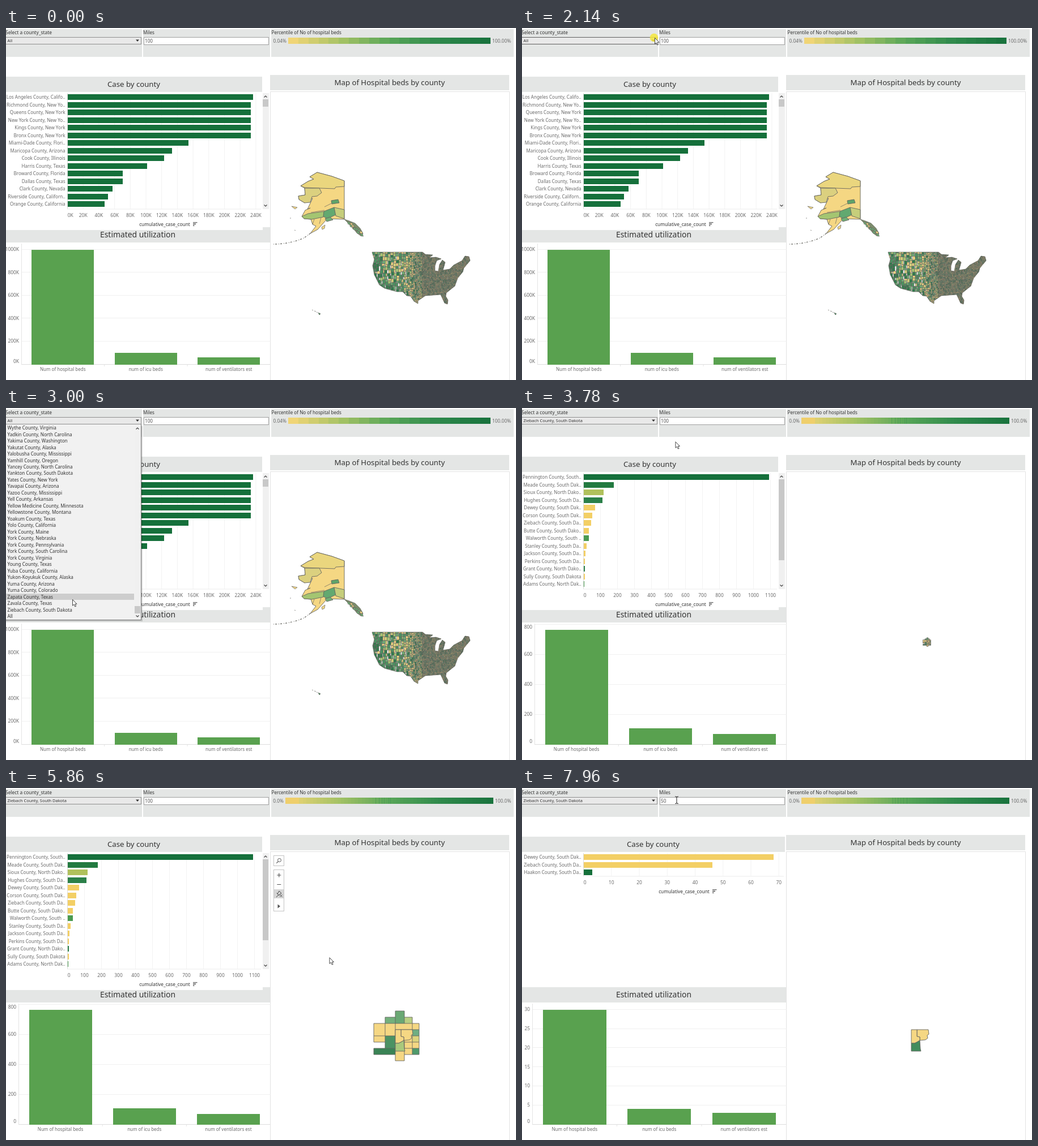
An HTML page for the animation above (8 s loop, 900 by 622 pixels).

```html
<!DOCTYPE html>
<html lang="en">
<head>
<meta charset="utf-8">
<title>Hospital beds dashboard</title>
<style>
html, body { margin: 0; width: 100%; height: 100%; overflow: hidden; background: #fff; }
svg { display: block; width: 900px; height: 622px; }
text { font-family: "Noto Sans", "Open Sans", sans-serif; white-space: pre; }
.title { font-weight: 500; }
rect { shape-rendering: crispEdges; }
.map path { stroke: #666660; stroke-width: .9; vector-effect: non-scaling-stroke; stroke-linejoin: round; }
</style>
</head>
<body>
<svg id="stage" viewBox="0 0 900 622"></svg>
<script>
const LOOP = 8000;
const stage = document.getElementById('stage');
const BAND = '#e4e6e5', INK = '#333', SOFT = '#6b6b6b', GREEN = '#59a14f';
const YEL = '#f5d783', GOLD = '#f3cf65', DARK = '#15703b', MID = '#2b8049', LEAF = '#4a9a50';

function el(parent, tag, attrs = {}) {
  const n = document.createElementNS('http://www.w3.org/2000/svg', tag);
  for (const k in attrs) n.setAttribute(k, attrs[k]);
  parent.appendChild(n);
  return n;
}
const group = (p, attrs) => el(p, 'g', attrs);
const rect = (p, x, y, width, height, fill, more) => el(p, 'rect', { x, y, width, height, fill, ...more });
const path = (p, d, fill = 'none', more) => el(p, 'path', { d, fill, ...more });
const line = (p, d, stroke, more) => path(p, d, 'none', { stroke, ...more });
function text(p, s, x, y, size = 8.1, fill = INK, anchor = 'start') {
  const n = el(p, 'text', { x, y, 'font-size': size, fill, 'text-anchor': anchor });
  n.textContent = s;
  return n;
}
const title = (p, s, x, y, size = 13.2) => text(p, s, x, y, size, INK, 'middle').setAttribute('class', 'title');
const show = (n, on) => n.setAttribute('display', on ? 'inline' : 'none');
const clamp = (v, lo, hi) => Math.max(lo, Math.min(hi, v));
const zoom = (x, y, k) => `translate(${x * (1 - k)} ${y * (1 - k)}) scale(${k}) `;

let seed = 11;
function rnd() {
  seed = (seed * 16807) % 2147483647;
  return seed / 2147483647;
}

// ---- fixed frame
for (const [x, w] of [[0, 240], [242, 224], [468, 428]]) rect(stage, x, 1.5, w, 49.5, BAND);
text(stage, 'Select a county_state', 81, 10.5, 8.35, INK, 'end');
text(stage, 'Miles', 242, 10.8);
text(stage, 'Percentile of No of hospital beds', 468.5, 10.8);
const sel = rect(stage, -.5, 16.5, 239, 12, '#e9e9e9', { stroke: '#8f8f8f' });
const selText = text(stage, 'All', 2.5, 25, 7.4);
path(stage, 'M229 20.5h6l-3 3.5z', INK);
rect(stage, 243.5, 16.5, 220, 13, '#fff', { stroke: '#a0a0a0' });
const miles = text(stage, '100', 245, 26, 8.2, '#555');
rect(stage, 466, 83, 422, 27, BAND);
title(stage, 'Map of Hospital beds by county', 677, 101);
line(stage, 'M466.5 622V112.5H888.5V622', '#e2e2e2');
rect(stage, 0, 352, 466, 27, BAND);
title(stage, 'Estimated utilization', 232.5, 370, 13.9);

// ---- legends
const RAMP = [[240, 213, 118], [165, 194, 101], [88, 166, 88], [47, 138, 76], [26, 116, 62]];
function ramp(k) {
  const p = Math.min(k, .9999) * 4, i = Math.floor(p);
  return `rgb(${RAMP[i].map((v, c) => Math.round(v + (RAMP[i + 1][c] - v) * (p - i)))})`;
}
function legend(p, x, w, steps, lo, hi) {
  text(p, lo, x - 3, 25.8, 8.4, SOFT, 'end');
  for (let i = 0; i < steps; i++) rect(p, x + i * w / steps, 17, w / steps + .4, 11, ramp(i / (steps - 1)));
  text(p, hi, x + w + 3, 25.8, 8.4, SOFT);
}

// ---- charts
function caseChart(p, { rows, ticks, step, unit = '', pitch, wide }) {
  const w = wide ? 464 : 452, bottom = wide ? 156 : 320;
  rect(p, 0, 86, w, 27, BAND);
  if (!wide) rect(p, 0, 113, 453, 244, '#fff');
  title(p, 'Case by county', w / 2 - .5, 103.5);
  for (let i = 0; i < ticks; i++) {
    const x = 108.5 + i * pitch, s = i * step + unit;
    line(p, `M${x} 115V${bottom}`, i ? '#f2f2f2' : '#dcdcdc');
    text(p, s, Math.max(x, 108.5 + s.length * 2.6), bottom + 13.5, 8.4, SOFT, 'middle');
  }
  line(p, `M108 ${bottom}H${w - 2}`, '#ececec');
  rows.forEach(([name, value, fill = DARK], i) => {
    const y = 122 + i * 13.53;
    text(p, name, 104.5, y + 3, 8.06, SOFT, 'end');
    rect(p, 109, Math.round(y) - 5, value / step * pitch, 10, fill);
  });
  const c = w / 2 + 54, y = bottom + 29.7;
  text(p, 'cumulative_case_count', c, y, 8.3, INK, 'middle');
  line(p, `M${c + 50} ${y - 6}h7.5m-7.5 2.7h5m-5 2.7h2.5`, INK, { 'stroke-width': 1.1 });
}
function scrollbar(p, x, top, bottom, y, h) {
  rect(p, x - 5.5, top, 11, bottom - top, '#f0f0f0');
  rect(p, x - 5, y, 10, h, '#c8c8c8');
  line(p, `M${x - 2.5} ${top + 7.5}l2.5 -2.5 2.5 2.5M${x - 2.5} ${bottom - 7.5}l2.5 2.5 2.5 -2.5`, '#444', { 'stroke-width': 1.2 });
}
const CATS = ['Num of hospital beds', 'num of icu beds', 'num of ventilators est'];
function useChart(p, { axis, step, unit = '', max, pitch, values }) {
  for (let i = 0; i * step <= max; i++) {
    const y = 594 - i * pitch;
    line(p, `M${axis} ${Math.floor(y) + .5}H466.5`, i ? '#f0f0f0' : '#dedede');
    text(p, i * step + unit, axis - 4, clamp(y, 387, 589) + 3, 8.4, SOFT, 'end');
  }
  line(p, `M${axis + .5} 381V594`, '#e4e4e4');
  const slot = (466.5 - axis) / 3;
  values.forEach((v, i) => {
    const mid = axis + (i + .5) * slot, h = v / step * pitch;
    rect(p, mid - slot * .375, 594.5 - h, slot * .75, h, GREEN);
    text(p, CATS[i], mid, 606, 8, SOFT, 'middle');
    if (i) line(p, `M${axis + i * slot} 595v3`, '#e4e4e4');
  });
}

const scenes = [0, 1, 2].map(() => group(stage));
const [all, near, close] = scenes;

legend(all, 498, 357, 20, '0.04%', '100.00%');
for (const p of [near, close]) {
  legend(p, 493, 367, 60, '0.0%', '100.0%');
  rect(p, 493, 17, 24, 11, '#efcf6c');
  for (let i = 0; i < 6; i++) rect(p, 652 + i * 5 + rnd() * 3, 17, 1, 11, '#3d9150', { opacity: .5 });
}

caseChart(all, {
  ticks: 13, step: 20, unit: 'K', pitch: 27.7,
  rows: [['Los Angeles County, Califo..', 236], ['Richmond County, New Yo..', 233], ['Queens County, New York', 233],
    ['New York County, New Yo..', 233], ['Kings County, New York', 233], ['Bronx County, New York', 233],
    ['Miami-Dade County, Flori..', 154], ['Maricopa County, Arizona', 133], ['Cook County, Illinois', 123],
    ['Harris County, Texas', 101], ['Broward County, Florida', 70], ['Dallas County, Texas', 70],
    ['Clark County, Nevada', 57], ['Riverside County, Californ..', 51], ['Orange County, California', 47]]
});
scrollbar(all, 458, 115, 320, 126, 13);

caseChart(near, {
  ticks: 12, step: 100, pitch: 30,
  rows: [['Pennington County, South..', 1090], ['Meade County, South Dak..', 178, '#237a40'],
    ['Sioux County, North Dako..', 117, '#b0c15c'], ['Hughes County, South Da..', 111, MID],
    ['Dewey County, South Dak..', 65, GOLD], ['Corson County, South Dak..', 50, GOLD],
    ['Ziebach County, South Da..', 43, GOLD], ['Butte County, South Dako..', 31, GOLD],
    ['Walworth County, South ..', 29, LEAF], ['Stanley County, South Da..', 17, GOLD],
    ['Jackson County, South Da..', 9, GOLD], ['Perkins County, South Da..', 7, GOLD],
    ['Grant County, North Dako..', 7, MID], ['Sully County, South Dakota', 7, GOLD],
    ['Adams County, North Dak..', 3, LEAF]]
});
scrollbar(near, 458, 115, 320, 126, 143);

caseChart(close, {
  ticks: 8, step: 10, pitch: 49.25, wide: true,
  rows: [['Dewey County, South Dak..', 68, GOLD], ['Ziebach County, South Da..', 46, GOLD], ['Haakon County, South Da..', 3]]
});

useChart(all, { axis: 27, step: 200, unit: 'K', max: 1000, pitch: 40.6, values: [1000, 101, 64] });
useChart(near, { axis: 22, step: 200, max: 800, pitch: 53, values: [766, 108, 70] });
useChart(close, { axis: 18, step: 5, max: 30, pitch: 33.8, values: [30, 4, 3] });

// ---- country map
const country = group(all, { class: 'map' });
const thin = { style: 'stroke-width:.7' };
path(country, 'M520 279L533 271 543 267 536 263 549 255 575 262 597 270V338L567 337 550 356 537 363 547 350 541 347' +
  ' 538 338 526 337 522 333 528 322 537 318 532 320 541 301 527 309 517 303 516 297 528 295 527 283Z', YEL);
path(country, 'M520 279L533 271 543 267 536 263 549 255 575 262 597 270V280L582 281 580 284 527 282Z', '#ead67e');
path(country, 'M527 283L553 283 557 291 549 297 540 298 537 308 527 309 517 303 516 297 528 295Z', '#dbd07f');
path(country, 'M522 333L533 328 562 324 560 334 540 338 526 337Z', '#a4c571');
path(country, 'M561 324L579 317 582 330 567 337 560 333Z', '#62a970');
path(country, 'M579 317L597 321V337L582 332Z', '#c6ce7b');
path(country, 'M574 305L586 303 588 309 575 311Z', '#5fa469');
path(country, 'M563 337L572 334 577 339 566 342Z', '#6fae76');
path(country, 'M538 326L562 322M544 338L541 347M556 335L553 346M562 316L574 310', 'none', thin);
path(country, 'M504 315l10 2-4 3zM557 352l6 -4 -1 6-4 2z', YEL, thin);
path(country, 'M597 338L606 341 616 345 625 354 630 363 627 368 619 362 611 352Z', '#7d8d6c', thin);
for (let k = 0; k < 1; k += 1 / 12)
  path(country, `M${602 + k * 22 + rnd() * 4} ${341 + k * 20 + rnd() * 4}l4 1 1 4-4-1z`, rnd() < .5 ? YEL : '#6fae76', thin);
path(country, 'M537 363L526 371Q500 382 471 382', 'none', { style: 'stroke-width:1.2;stroke-dasharray:3 2 1 3' });
path(country, 'M540 498l2 1M544 500l3 1M548 502l2 1M551 503l4 2-2 2z', '#3f8a5a', thin);
path(country, 'M501 336h2M509 357l2 1', 'none', thin);

const SHORE = 'M646 396H735L740 400 753 401 747 406 759 405 768 408 760 411 757 420 757 429 763 430 765 418 770 410 775 414 771 428' +
  ' 783 426 790 419 805 411 810 403 817 404 819 411 808 424 806 431 797 442 792 456 777 468 776 474 780 481 779 488 774 486' +
  ' 767 471 740 473 727 482 727 487 720 483 714 474 707 473 700 466 690 466 668 460 659 454 650 436 647 420 650 409Z';
path(el(el(stage, 'defs'), 'clipPath', { id: 'shore' }), SHORE);
const land = group(country, { 'clip-path': 'url(#shore)' });
const TONES = [YEL, '#d4d07c', '#a7c573', '#6fae76', '#4b9261', '#2f7c4c'];
const cells = TONES.map(() => '');
const coastal = (x, y) => x < 660 || (y > 446 && x < 698);
for (let x = 645; x < 820;) {
  const size = clamp(4.8 - (x - 690) / 14, 2.3, 4.8);
  for (let y = 394; y < 490;) {
    const h = size * (.7 + rnd() * .8), dx = (rnd() - .5) * size * .6, r = rnd();
    const tone = Math.floor(6 * (coastal(x, y) ? r ** .4 : r ** 1.3));
    cells[tone] += `M${(x + dx).toFixed(1)} ${y.toFixed(1)}h${size.toFixed(1)}v${h.toFixed(1)}h${-size.toFixed(1)}z`;
    y += h;
  }
  x += size;
}
cells.forEach((d, i) => path(land, d, TONES[i], thin));
rect(land, 734, 390, 90, 100, '#66685f', { opacity: .5 });
path(country, SHORE, 'none', thin);

// ---- county maps: one letter per county on a coarse grid
const TILES = ['..s..', '.asg.', 'bpccw', 'bpzdl', 'umzdo', '.mhty', 'nnjkq', '..j..'];
const FILL = { s: '#6aa874', a: '#74b07c', g: '#b8cf82', l: '#6fae82', o: '#dcd47d', m: '#4b9263', h: '#a9c97c', n: '#3a8355', q: '#4f9a6b' };
const colX = i => 649 + 21 * i - i * i, rowY = j => 394 + 11 * j;
const tile = (i, j) => (TILES[j] || '')[i] || '.';
const cluster = group(near, { class: 'map' });
let edges = '';
for (let j = 0; j <= 8; j++) for (let i = 0; i <= 5; i++) {
  const c = tile(i, j), x = colX(i), y = rowY(j), w = colX(i + 1) - x;
  if (c !== '.') rect(cluster, x, y, w, 11, FILL[c] || YEL, { 'shape-rendering': 'auto' });
  if (c !== tile(i - 1, j)) edges += `M${x} ${y}v11`;
  if (c !== tile(i, j - 1)) edges += `M${x} ${y}h${w}`;
}
path(cluster, edges);

const trio = group(close, { class: 'map' });
for (const [p, low] of [[cluster, FILL.h], [trio, '#438c5d']]) {
  path(p, 'M697 427H717L718 435 715 437 716 442 712 445 702 446V440L697 439Z', YEL);
  path(p, 'M687 427H697V439L702 440V446L697 449 693 451H687Z', YEL);
  path(p, 'M687 451H693L697 449 702 446 703 461 704 465H687Z', low);
}

// wheel zooms around the pointer
const inner = k => zoom(706.6, 425.8, 1 / k), outer = k => zoom(724.4, 402.4, 1 / k) + inner(2.25);
const ZOOMS = [[0, outer(2.57)], [5010, outer(1.6)], [5240, inner(2.25)], [5540, inner(1.4)], [5710, '']];

// ---- map tools
const tools = group(stage);
for (const [y, h] of [[119.5, 18], [144.5, 73]]) rect(tools, 472.5, y, 18, h, '#fff', { stroke: '#c4c4c4' });
rect(tools, 473, 179, 17, 16, '#d6d6d6');
el(tools, 'circle', { cx: 482.5, cy: 127.5, r: 3, fill: 'none', stroke: '#555' });
line(tools, 'M480.3 129.8l-3 3M478.3 154h7M481.8 150.5v7M478.3 170.5h7', '#555', { 'stroke-width': 1.2 });
line(tools, 'M477 193l3.5-4M477.5 185.5l5 5M479 187l3-5 4 4-4.5 3M483.5 188.5l4 4M487.5 188.5l-4 4', '#444');
path(tools, 'M479.5 205.5v7l4.5-3.5z', '#555');

// ---- drop-down list
const ROWS = ('Wythe County, Virginia|Yadkin County, North Carolina|Yakima County, Washington|Yakutat County, Alaska|' +
  'Yalobusha County, Mississippi|Yamhill County, Oregon|Yancey County, North Carolina|Yankton County, South Dakota|' +
  'Yates County, New York|Yavapai County, Arizona|Yazoo County, Mississippi|Yell County, Arkansas|' +
  'Yellow Medicine County, Minnesota|Yellowstone County, Montana|Yoakum County, Texas|Yolo County, California|' +
  'York County, Maine|York County, Nebraska|York County, Pennsylvania|York County, South Carolina|York County, Virginia|' +
  'Young County, Texas|Yuba County, California|Yukon-Koyukuk County, Alaska|Yuma County, Arizona|Yuma County, Colorado|' +
  'Zapata County, Texas|Zavala County, Texas|Ziebach County, South Dakota|All').split('|');
const ROW = 11.48, TOP = 29.3;
const list = group(stage);
rect(list, 0, 32, 241, 345, '#000', { opacity: .15 });
rect(list, 0, 29, 239, 346, '#f1f1f1');
line(list, 'M238.5 29V374.5H0', '#777');
const hover = rect(list, 0, TOP, 226, ROW, '#cdcdcd');
ROWS.forEach((s, i) => text(list, s, 2.5, TOP + 8.8 + i * ROW, 8.1));
scrollbar(list, 232, 30, 374, 350, 12.5);

// ---- pointer: each move is start, end, x, y
const halo = el(stage, 'circle', { r: 7.3, fill: '#f4e63c', opacity: .85 });
const arrow = path(stage, 'M.5 .5V11.2L3 9 4.8 13 6.6 12.2 4.9 8.3H8Z', '#fff', { stroke: '#333', 'stroke-width': .9 });
const beam = line(stage, 'M-3 -6Q0 -6 0 -4.5Q0 -6 3 -6M0 -4.5V5M-3 6.5Q0 6.5 0 5Q0 6.5 3 6.5', '#333', { 'stroke-width': 1.1 });
const MOVES = [
  [370, 900, 228, 19], [1070, 1840, 234, 17], [2300, 3000, 117, 338], [3080, 3230, 117, 352],
  [3400, 4080, 291, 20], [4390, 4950, 724, 402], [5240, 5390, 706, 426], [5740, 6640, 273, 21]
];
function pointer(t) {
  let x = 150, y = -14;
  for (const [from, to, nx, ny] of MOVES) {
    const k = 1 - (1 - clamp((t - from) / (to - from), 0, 1)) ** 2.6;
    x += (nx - x) * k;
    y += (ny - y) * k;
  }
  return [x, y];
}
const last = (steps, t) => steps.filter(s => s[0] <= t).pop()[1];
const TYPED = [[0, '100'], [6860, '10'], [6930, '1'], [7010, ''], [7330, '5'], [7560, '50']];

function draw(t) {
  const now = t < 3700 ? 0 : t < 7960 ? 1 : 2;
  scenes.forEach((s, i) => show(s, i === now));
  cluster.setAttribute('transform', last(ZOOMS, t));
  miles.textContent = last(TYPED, t);
  selText.textContent = t < 3460 ? 'All' : 'Ziebach County, South Dakota';

  const [x, y] = pointer(t), on = t >= 370;
  const onRow = y > 15 && y < 30, inField = onRow && x > 243 && x < 464;
  sel.setAttribute('stroke', on && onRow && x < 240 ? '#5f5f5f' : '#8f8f8f');
  show(arrow, on && !inField);
  show(beam, on && inField);
  for (const n of [arrow, beam]) n.setAttribute('transform', `translate(${x} ${y})`);
  show(halo, (t >= 2140 && t < 2220) || (t >= 3380 && t < 3460));
  halo.setAttribute('cx', x - 1);
  halo.setAttribute('cy', y);
  show(tools, x > 467 && y > 113);

  show(list, t >= 2220 && t < 3460);
  const row = y < TOP ? 29 : Math.min(28, Math.floor((y - TOP) / ROW));
  hover.setAttribute('y', TOP + row * ROW);
}

const start = performance.now();
function tick() {
  draw((performance.now() - start) % LOOP);
  requestAnimationFrame(tick);
}
tick();
</script>
</body>
</html>
```
